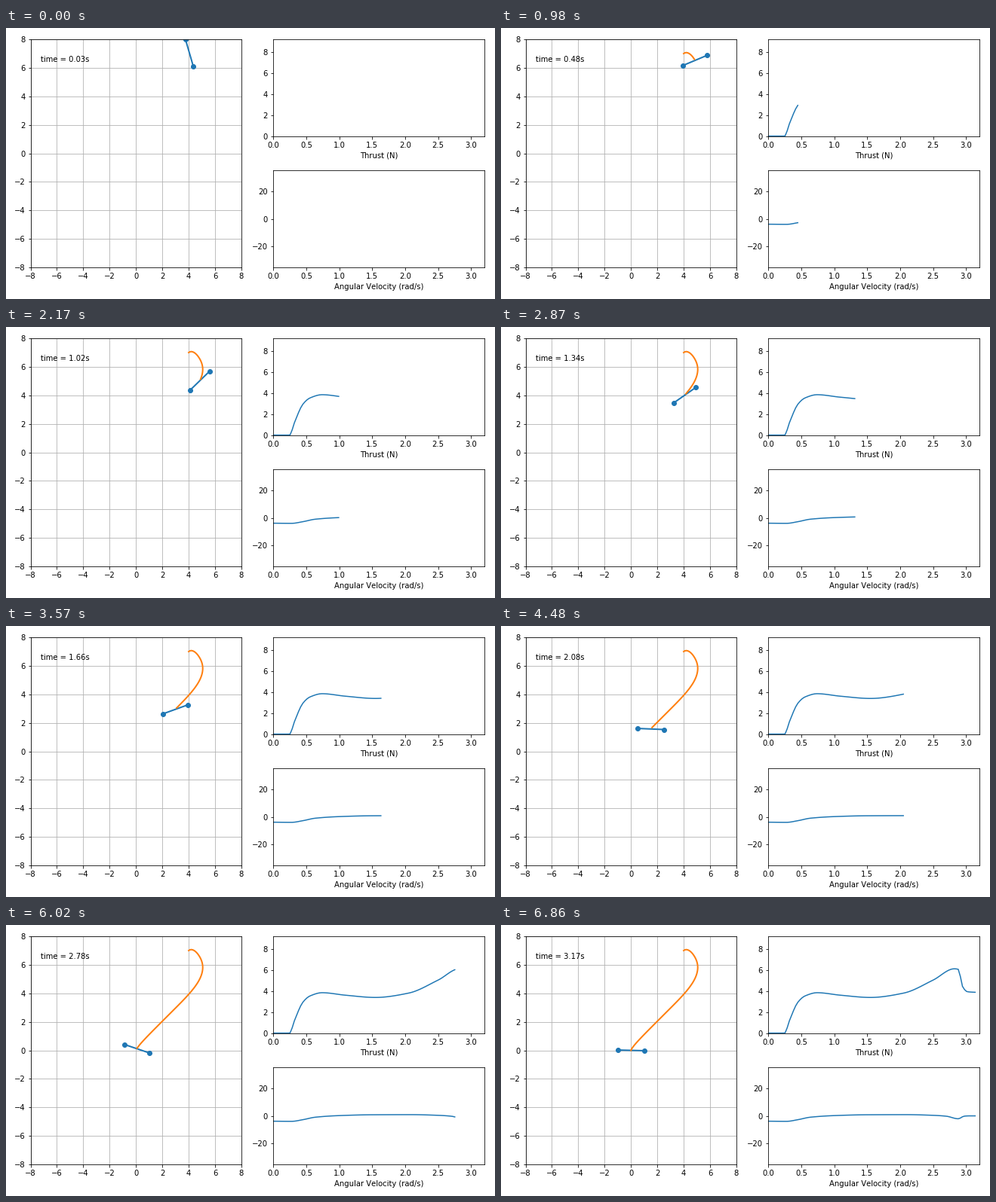
These frames come from a looping animation (648 by 360 pixels, 6930 ms). A matplotlib script:

```python
import numpy as np
import matplotlib.pyplot as plt
from matplotlib.animation import FuncAnimation

W, H, DPI = 648, 360, 72
FRAMES, INTERVAL, DT = 99, 70, 0.032

plt.rcParams["text.kerning_factor"] = 6


def hermite(t, tk, vk, slope):
    """Cubic Hermite curve through (tk, vk) with the given slopes."""
    k = np.clip(np.searchsorted(tk, t, side="right") - 1, 0, len(tk) - 2)
    h = tk[k + 1] - tk[k]
    s = (t - tk[k]) / h
    return ((1 + 2 * s) * (1 - s) ** 2 * vk[k] + s * (1 - s) ** 2 * h * slope[k]
            + s * s * (3 - 2 * s) * vk[k + 1] + s * s * (s - 1) * h * slope[k + 1])


def monotone(t, *keys):
    """Curve through (time, value) keys that never overshoots them."""
    tk, vk = np.array(keys).T
    d = np.diff(vk) / np.diff(tk)
    a, b = d[:-1], d[1:]
    same = a * b > 0
    inner = np.where(same, 2 * a * b / np.where(same, a + b, 1), 0)
    return hermite(t, tk, vk, np.r_[d[0], inner, d[-1]])


def spline(t, tk, vk, start):
    """Smooth cubic spline that leaves at speed start and ends at rest."""
    n, h = len(tk), np.diff(tk)
    d = np.diff(vk) / h
    mat, rhs = np.eye(n), np.zeros(n)
    rhs[0] = start
    for i in range(1, n - 1):
        p, q = 1 / h[i - 1], 1 / h[i]
        mat[i, i - 1:i + 2] = p, 2 * (p + q), q
        rhs[i] = 3 * (d[i - 1] * p + d[i] * q)
    return hermite(t, tk, vk, np.linalg.solve(mat, rhs))


time = np.arange(FRAMES + 1) * DT

force = monotone(time, (0, 0), (.25, 0), (.32, 1.15), (.45, 2.93), (.56, 3.53),
                 (.74, 3.83), (1.1, 3.59), (1.55, 3.38), (2.05, 3.79), (2.5, 5.03),
                 (2.82, 6.1), (2.88, 6.05), (2.95, 4.35), (3.02, 3.92), (3.2, 3.85))
spin = monotone(time, (0, -3.85), (.28, -3.95), (.45, -2.75), (.64, -.95), (1, .2),
                (1.5, .8), (2.1, .88), (2.5, .4), (2.7, -.25), (2.88, -2.1),
                (2.97, -.2), (3.05, 0), (3.2, 0))

# The tilt is the running integral of the angular velocity.
tilt = -1.39 - np.r_[0, np.cumsum((spin[1:] + spin[:-1]) / 2 * DT)]

# Flight path: time, x, y
pt, px, py = np.array([
    (0, 4, 7), (.48, 4.86, 6.52), (.77, 5.065, 5.785), (1.024, 4.85, 5.03),
    (1.664, 2.97, 2.94), (2.08, 1.49, 1.57), (2.464, .43, .55),
    (2.944, .01, .03), (3.2, 0, 0)]).T
xs = spline(time, pt, px, 1.75)
ys = spline(time, pt, py, 1.3)

fig = plt.figure(figsize=(W / DPI, H / DPI), dpi=DPI, facecolor="white")


def panel(left, top, right, bottom, xlim, ylim, xticks, yticks, label=""):
    ax = fig.add_axes([left / W, 1 - bottom / H, (right - left) / W, (bottom - top) / H])
    ax.set(xlim=xlim, ylim=ylim, xticks=xticks, yticks=yticks, xlabel=label)
    return ax


TOP, BOTTOM, HEIGHT = 15.02, 318.02, 128.55
even = np.arange(-8, 9, 2)
half = np.arange(0, 3.1, 0.5)
scene = panel(32.52, TOP, 311.95, BOTTOM, (-8, 8), (-8, 8), even, even)
scene.grid()
upper = panel(354.1, TOP, 633.9, TOP + HEIGHT, (0, 3.2), (0, 9.18), half,
              range(0, 9, 2), "Thrust (N)")
lower = panel(354.1, BOTTOM - HEIGHT, 633.9, BOTTOM, (0, 3.2), (-35.1, 34.9), half,
              (-20, 0, 20), "Angular Velocity (rad/s)")

rod, = scene.plot([], [], "o-", lw=2)
trail, = scene.plot([], [], lw=2)
clock = scene.text(0.05, 0.9, "", transform=scene.transAxes)
force_line, = upper.plot([], [])
spin_line, = lower.plot([], [])
arm = np.array([-1, 1])


def update(i):
    j = i + 1
    rod.set_data(xs[j] + arm * np.cos(tilt[j]), ys[j] + arm * np.sin(tilt[j]))
    trail.set_data(xs[:j], ys[:j])
    force_line.set_data(time[:j], force[:j])
    spin_line.set_data(time[:j], spin[:j])
    clock.set_text(f"time = {time[j]:.2f}s")
    return rod, trail, force_line, spin_line, clock


anim = FuncAnimation(fig, update, frames=FRAMES, interval=INTERVAL,
                     repeat=True, repeat_delay=0)
plt.show()
```
